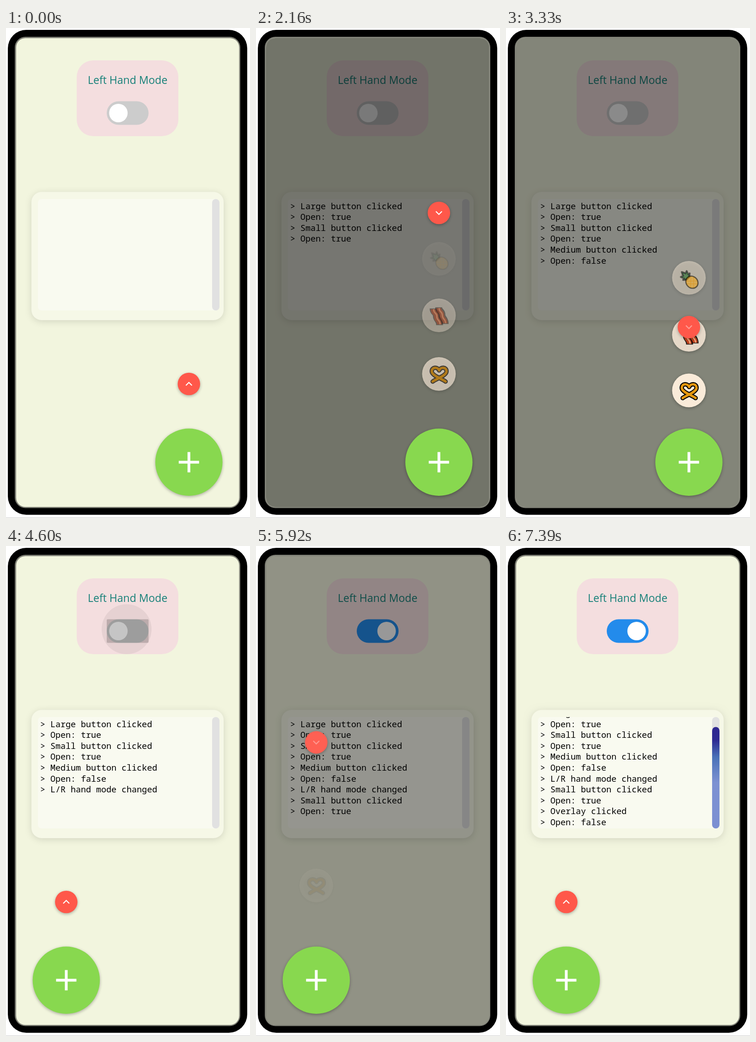
Animation, 528 px wide and 1060 px high, one loop 7470 ms. Source, as an HTML page with a canvas:

```html
<!DOCTYPE html>
<html lang="en">
<head>
<meta charset="utf-8">
<title>Floating buttons</title>
<style>
  html, body { margin: 0; width: 100%; height: 100%; overflow: hidden; background: #fff; }
  canvas { display: block; width: 528px; height: 1060px; }
</style>
</head>
<body>
<canvas id="stage"></canvas>
<script>
const LOOP = 7470, TAU = Math.PI * 2;
const canvas = document.getElementById('stage');
const dpr = window.devicePixelRatio || 1;
canvas.width = 528 * dpr;
canvas.height = 1060 * dpr;
const c = canvas.getContext('2d');

const MENU = [[-9999, false], [1920, true], [3260, false], [5760, true], [6550, false]];
const HAND_AT = 4600;
const LOG = [
  [780, 'Large button clicked', 'Open: true'],
  [1920, 'Small button clicked', 'Open: true'],
  [3260, 'Medium button clicked', 'Open: false'],
  [HAND_AT, 'L/R hand mode changed'],
  [5760, 'Small button clicked', 'Open: true'],
  [6550, 'Overlay clicked', 'Open: false']
];

const clamp = v => Math.min(1, Math.max(0, v));
const mix = (a, b, p) => a + (b - a) * p;

function bezier(x1, y1, x2, y2) {
  const at = (a, b, s) => 3 * (1 - s) ** 2 * s * a + 3 * (1 - s) * s * s * b + s ** 3;
  return x => {
    if (x <= 0 || x >= 1) return clamp(x);
    let lo = 0, hi = 1;
    for (let i = 0; i < 22; i++) {
      const mid = (lo + hi) / 2;
      if (at(x1, x2, mid) < x) lo = mid; else hi = mid;
    }
    return at(y1, y2, lo);
  };
}
const ease = bezier(.25, .1, .25, 1);
const backOut = bezier(.175, .885, .32, 1.12);

function box(x, y, x2, y2, r, fill) {
  c.beginPath();
  c.roundRect(x, y, x2 - x, y2 - y, r);
  c.fillStyle = fill;
  c.fill();
}

function disc(x, y, r, fill) {
  c.beginPath();
  c.arc(x, y, r, 0, TAU);
  c.fillStyle = fill;
  c.fill();
}

function shadowed(alpha, blur, dy, draw) {
  c.save();
  c.shadowColor = `rgba(0,0,0,${alpha})`;
  c.shadowBlur = blur * dpr;
  c.shadowOffsetY = dy * dpr;
  draw();
  c.restore();
}

function stroke(path, width, color) {
  c.lineWidth = width;
  c.strokeStyle = color;
  c.stroke(path);
}

// Food icons, each drawn around its button's centre
const pretzelPath = new Path2D('M-14 15C-4 8 16 2 16 -7C16 -17 3 -17 0 -9C-3 -17 -16 -17 -16 -7C-16 2 4 8 14 15');
function pretzel() {
  c.lineCap = c.lineJoin = 'round';
  stroke(pretzelPath, 9.5, '#000');
  stroke(pretzelPath, 5.2, '#e6980e');
}

const edge = new Path2D('M0 -1.5c0 10 7 7 7 16s7 7 7 20');
const strip = new Path2D('M0 0c0 10 7 7 7 16s7 7 7 17');
function bacon() {
  for (const [x, y] of [[-13, -15], [-1, -17.5]]) {
    c.save();
    c.translate(x, y);
    stroke(edge, 15, '#000');
    stroke(strip, 10.5, '#d6481f');
    c.translate(1, 0);
    stroke(strip, 3, '#f8b586');
    c.restore();
  }
}

const crown = new Path2D('M-4 -12L-10 -17L-6 -18L-9 -25L-4 -23L0 -31L4 -23L9 -25L6 -18L10 -17L4 -12Z');
const leaves = new Path2D('M0 -13V-26M-1 -14L-6 -22M1 -14L6 -22');
const weave = new Path2D('M-11 -6L6 11M-8 -11L11 7M11 -6L-6 11M8 -11L-11 7');
function pineapple() {
  c.translate(6, 8);
  c.rotate(-Math.PI / 4);
  c.lineJoin = 'round';
  stroke(crown, 4, '#000');
  c.fillStyle = '#143d25';
  c.fill(crown);
  stroke(leaves, 2.4, '#55a548');
  c.beginPath();
  c.ellipse(0, 0, 12.3, 14, 0, 0, TAU);
  c.fillStyle = '#f5a50a';
  c.fill();
  c.save();
  c.clip();
  stroke(weave, 1, '#d98500');
  c.restore();
  c.lineWidth = 2.6;
  c.strokeStyle = '#000';
  c.stroke();
}
const ITEMS = [[784, pretzel], [666, bacon], [549, pineapple]];

function phone() {
  c.fillStyle = '#fff';
  c.fillRect(0, 0, 528, 1060);
  c.fillStyle = '#ccc';
  c.fillRect(0, 1059, 528, 1);
  box(4, 4, 522, 1053, 40, '#000');
  box(19, 19, 507, 1038.5, 23, '#808177');
  box(22, 22, 504.5, 1036, 20, '#f2f5de');
}

function handCard(t) {
  box(153, 70, 373, 234, 36, '#f4dedf');
  c.font = '23px "Open Sans", "Noto Sans", sans-serif';
  c.textAlign = 'center';
  c.fillStyle = '#158078';
  c.fillText('Left Hand Mode', 263.2, 121);
  const since = t - HAND_AT, on = ease(since / 380);
  const shade = (a, b) => Math.round(mix(a, b, on));
  box(218, 158.5, 308.5, 209.5, 25.5, `rgb(${shade(204, 35)},${shade(204, 139)},${shade(204, 235)})`);
  disc(mix(243.2, 282.6, on), 184, 20, '#fff');
  if (since >= 0) {
    const tap = .18 * (1 - clamp((since - 60) / 120));
    box(218, 158.5, 308.5, 209.5, 2, `rgba(0,0,0,${tap})`);
    disc(261, 180, 54, `rgba(0,0,0,${.06 * (1 - clamp((since - 60) / 300))})`);
  }
}

function logCard(t) {
  shadowed(.13, 16, 3, () => box(55, 354.5, 471, 632, 22, '#f6f8e7'));
  box(69, 370, 462, 611, 8, '#f9faf0');
  box(446, 370, 462, 611, 8, '#e1e1e1');
  const lines = LOG.filter(e => t >= e[0]).flatMap(e => e.slice(1));
  const scroll = Math.max(0, lines.length - 10) * 23.6;
  if (scroll) {
    const g = c.createLinearGradient(0, 391, 0, 611);
    g.addColorStop(0, '#2e268f');
    g.addColorStop(.13, '#2e2a92');
    g.addColorStop(.3, '#4a72b8');
    g.addColorStop(.55, '#7d91d2');
    g.addColorStop(1, '#7b8fd2');
    box(446, 391.5, 462, 611, 8, g);
  }
  c.save();
  c.beginPath();
  c.rect(69, 370, 377, 241);
  c.clip();
  c.font = '18.35px "Noto Sans Mono", "DejaVu Sans Mono", monospace';
  c.textAlign = 'left';
  c.fillStyle = '#000';
  lines.forEach((line, i) => c.fillText('> ' + line, 74, 391.6 + i * 23.6 - scroll));
  c.restore();
}

function menu(t) {
  const x = t < HAND_AT ? 395.8 : 130.4;
  const [start, open] = MENU.filter(e => t >= e[0]).pop();
  const since = t - start;
  const progress = (curve, length, delay = 0) => {
    const p = curve((since - delay) / length);
    return open ? p : 1 - p;
  };
  const press = at => t < at ? 0 : .13 * (1 - clamp((t - at - 60) / 160));

  box(22, 22, 504.5, 1036, 20, `rgba(0,0,0,${.6 * progress(ease, 410)})`);

  ITEMS.forEach(([y, icon], i) => {
    const delay = open ? 140 + 40 * i : 40 * (2 - i);
    const alpha = progress(ease, 250, delay);
    if (alpha <= 0) return;
    c.save();
    c.globalAlpha = alpha;
    c.translate(x, y - 51 * (1 - progress(ease, 500, delay)));
    shadowed(.3, 6, 2, () => disc(0, 0, 36.4, '#faebd9'));
    c.translate(.5, 1.5);
    icon();
    c.restore();
  });

  c.save();
  c.translate(x, mix(770, 408, progress(backOut, 400)));
  shadowed(.3, 6, 2, () => disc(0, 0, 24.3, '#ff584a'));
  disc(0, 0, 24.3, `rgba(255,255,255,${Math.max(press(1920), press(5760))})`);
  const turn = progress(clamp, 240);
  const chevron = (dir, alpha) => {
    c.globalAlpha = clamp(alpha);
    stroke(new Path2D(`M-6.5 ${3.3 * dir}L0 ${-3.2 * dir}L6.5 ${3.3 * dir}`), 2.3, '#fff');
  };
  chevron(1, 1 - turn * 2);
  chevron(-1, turn * 2 - 1);
  c.restore();

  c.save();
  c.translate(x, 939.3);
  shadowed(.3, 6, 2, () => disc(0, 0, 72.7, '#88d84f'));
  disc(0, 0, 72.7, `rgba(255,255,255,${press(780)})`);
  c.fillStyle = '#fff';
  c.fillRect(-22, -3, 44, 6);
  c.fillRect(-3, -22, 6, 44);
  c.restore();
}

const began = performance.now();
function frame() {
  const t = (performance.now() - began) % LOOP;
  c.setTransform(dpr, 0, 0, dpr, 0, 0);
  phone();
  handCard(t);
  logCard(t);
  menu(t);
  requestAnimationFrame(frame);
}
frame();
</script>
</body>
</html>
```
